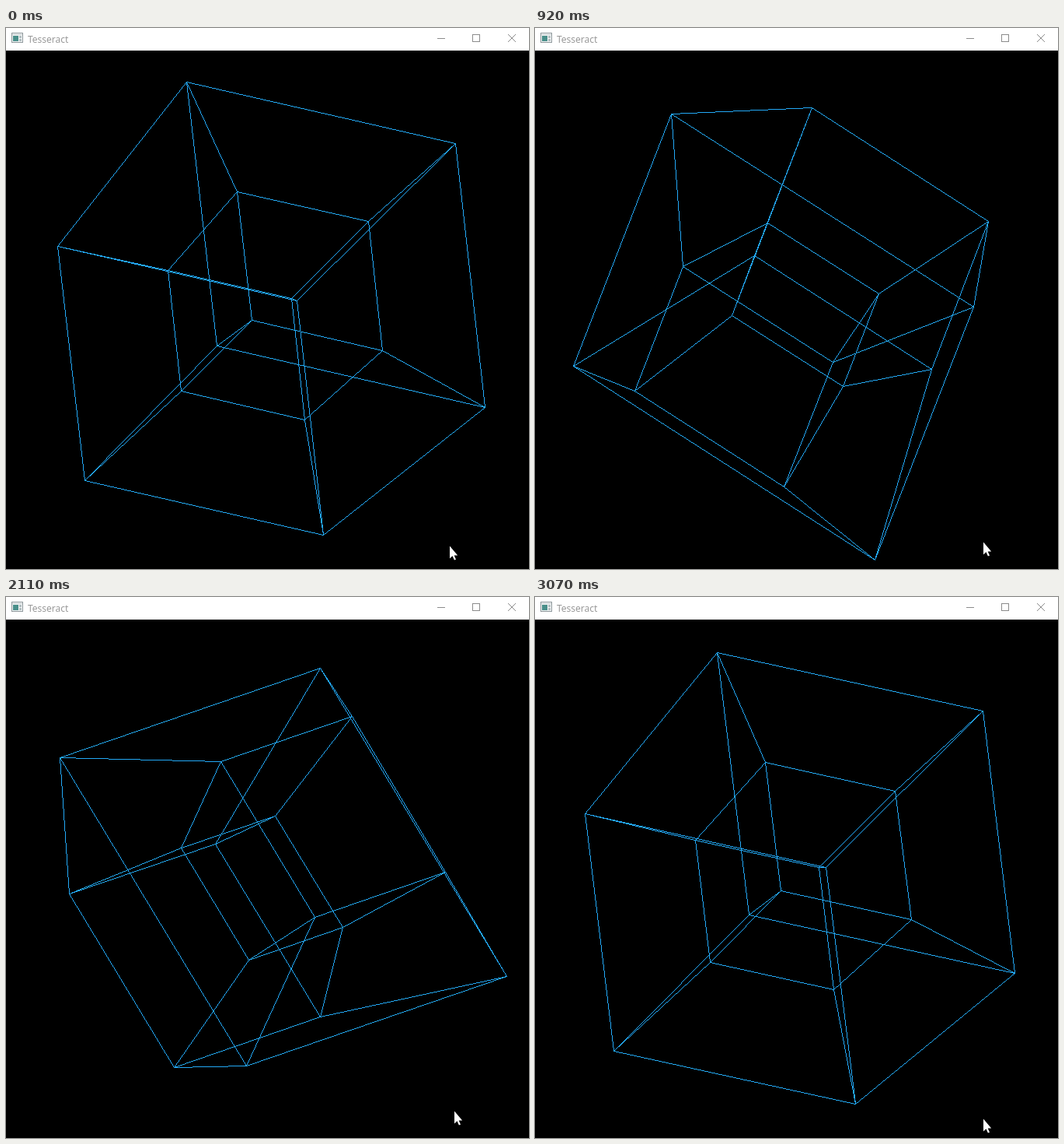
Write an HTML page with a canvas that moves like this. It is 673 px wide and 695 px high and loops after 3160 ms.

```html
<!DOCTYPE html>
<html lang="en">
<head>
<meta charset="utf-8">
<title>Tesseract</title>
<style>
  html, body { margin: 0; width: 100%; height: 100%; overflow: hidden; background: #000; }
  .bar { position: absolute; left: 0; top: 0; width: 673px; height: 29px; background: #fff; }
  .bar span {
    position: absolute; left: 28px; top: 6px;
    font: 12px/18px "Noto Sans", "Open Sans", sans-serif; color: #999;
  }
  svg { position: absolute; left: 0; top: 0; }
  .buttons { fill: none; stroke: #8c8c8c; }
  canvas { position: absolute; left: 0; top: 29px; }
</style>
</head>
<body>
<div class="bar">
  <span>Tesseract</span>
  <svg width="673" height="29">
    <rect x="7.5" y="6.5" width="14" height="12" fill="#f4f6f6" stroke="#8f989c"/>
    <path d="M8 8.5H21" stroke="#c9d0d3"/>
    <rect x="9" y="10" width="7" height="7" fill="#4a8f8a"/>
    <path d="M17 10h3v3h-3zM17 14h3v3h-3z" fill="#b4bfc2"/>
    <g class="buttons">
      <path d="M555 13.5H565"/>
      <rect x="600.5" y="8.5" width="9" height="9"/>
      <path d="M646 8L656 18M656 8L646 18"/>
    </g>
  </svg>
</div>
<canvas id="view" width="673" height="666"></canvas>
<svg width="673" height="695">
  <path id="cursor" fill="#fff" d="M0 .5V16.5L3.5 13.2L5.9 18.6L8 17.7L5.7 12.4H10.2Z"/>
</svg>
<script>
const ctx = document.getElementById('view').getContext('2d');
const cursor = document.getElementById('cursor');
ctx.fillStyle = '#23a9f7';

// How long each step stays, in units of 10 ms
const holds = [
  5, 8, 8, 8, 8, 9, 8, 7,
  8, 8, 8, 8, 8, 8, 8,
  8, 7, 8, 8, 8, 8, 8,
  6, 9, 8, 8, 8, 7, 9,
  10, 6, 8, 8, 8, 8, 8,
  8, 8, 8, 9
];
const LOOP = 3160;

// Turn in the xy plane: [step, degrees]
const turns = [[0, 3.4], [8, 20.98], [17, 41.18], [23, 54.58], [30, 71.28], [35, 83.3], [39, 92.85]];

const CENTER = [336.9, 337.72];
const SCALE = 379.5;
const EYE = 3;
// Screen vectors of the 3D axes under the tilted orthographic view
const P = (2 + Math.SQRT2) / 4, Q = (2 - Math.SQRT2) / 4;

function stepAt(ms) {
  let i = 0;
  for (let end = holds[0] * 10; ms >= end && i < holds.length - 1; end += holds[i] * 10) i++;
  return i;
}

function turnAt(step) {
  let k = 1;
  while (k < turns.length - 1 && step > turns[k][0]) k++;
  const [s0, a0] = turns[k - 1], [s1, a1] = turns[k];
  return (a0 + (a1 - a0) * (step - s0) / (s1 - s0)) * Math.PI / 180;
}

function rotate(a, b, angle) {
  const c = Math.cos(angle), s = Math.sin(angle);
  return [a * c - b * s, a * s + b * c];
}

// Corner bits 0..3 choose the signs of x, y, z, w
function project(corner, angle) {
  const sign = bit => (corner >> bit & 1) * 2 - 1;
  const [x, y] = rotate(sign(0), sign(1), angle);
  const [z, w] = rotate(sign(2), sign(3), angle * 2);
  const s = SCALE / (EYE - w);
  return [
    Math.floor(CENTER[0] + s * (P * x + Q * y + z / 2)),
    Math.floor(CENTER[1] + s * (Q * x + P * y - z / 2))
  ];
}

// One-pixel line without smoothing
function line([x0, y0], [x1, y1]) {
  const n = Math.max(Math.abs(x1 - x0), Math.abs(y1 - y0), 1);
  for (let i = 0; i <= n; i++) {
    ctx.fillRect(Math.round(x0 + (x1 - x0) * i / n), Math.round(y0 + (y1 - y0) * i / n), 1, 1);
  }
}

function draw(step) {
  const angle = turnAt(step);
  const points = Array.from({ length: 16 }, (_, corner) => project(corner, angle));
  ctx.clearRect(0, 0, 673, 666);
  for (let corner = 0; corner < 16; corner++) {
    for (let bit = 1; bit < 16; bit *= 2) {
      if (!(corner & bit)) line(points[corner], points[corner | bit]);
    }
  }
  const spot = step < 3 ? '571 665' : step < 38 ? '577 660' : '577 670';
  cursor.setAttribute('transform', `translate(${spot})`);
}

let shown = -1;
function tick() {
  const step = stepAt(performance.now() % LOOP);
  if (step !== shown) draw(shown = step);
  requestAnimationFrame(tick);
}
tick();
</script>
</body>
</html>
```
